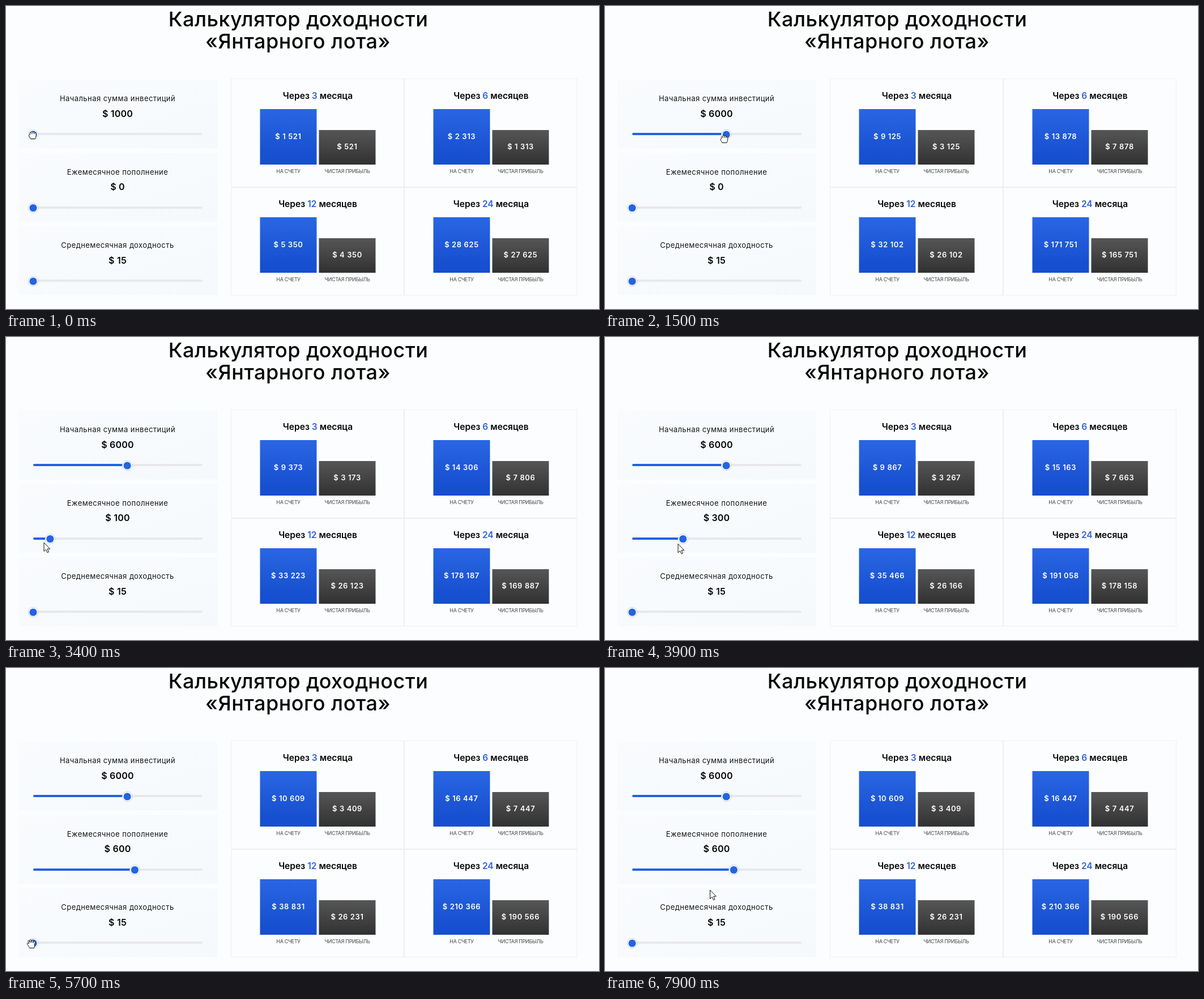
Write an HTML page that moves like this. It is 1047x535 px and loops after 8000 ms.

```html
<!DOCTYPE html>
<html lang="ru">
<head>
<meta charset="utf-8">
<title>Калькулятор доходности</title>
<style>
html, body { margin: 0; width: 100%; height: 100%; overflow: hidden; background: #fcfdfe; }
svg { display: block; width: 100vw; height: 100vh; }
text { font-family: Inter, "Open Sans", sans-serif; text-anchor: middle; fill: #050505; }
.title { font-size: 36px; font-weight: 500; letter-spacing: .5px; }
.label { font-size: 13px; letter-spacing: .45px; fill: #151515; }
.value { font-size: 16px; font-weight: 600; letter-spacing: .2px; }
.head { font-size: 15.6px; font-weight: 600; }
.head tspan { fill: #2f62df; }
.sum { font-size: 13px; font-weight: 600; letter-spacing: .6px; fill: #fff; }
.note { font-size: 9px; letter-spacing: -.35px; fill: #484848; }
</style>
</head>
<body>
<svg id="stage" viewBox="0 0 1047 535">
  <defs>
    <linearGradient id="blue" x2="0" y2="1">
      <stop stop-color="#2a66e3"/><stop offset=".85" stop-color="#164fcf"/>
    </linearGradient>
    <linearGradient id="dark" x2="0" y2="1">
      <stop stop-color="#565656"/><stop offset="1" stop-color="#313131"/>
    </linearGradient>
    <linearGradient id="panel" x2="1" y2="1">
      <stop stop-color="#f9fbfd"/><stop offset="1" stop-color="#f6f9fc"/>
    </linearGradient>
  </defs>
</svg>
<script>
const NS = 'http://www.w3.org/2000/svg';
const stage = document.getElementById('stage');
const LOOP = 8000, STEP = 100;
const TRACK_X = 48, TRACK_W = 299;

function add(tag, attrs, text) {
  const node = document.createElementNS(NS, tag);
  for (const key in attrs) node.setAttribute(key, attrs[key]);
  if (text !== undefined) node.textContent = text;
  stage.appendChild(node);
  return node;
}
const label = (cls, x, y, text) => add('text', { class: cls, x, y }, text);
const rect = (x, y, width, height, fill, rx = 0) => add('rect', { x, y, width, height, fill, rx });

// Keys are [time, value, ...]; linear in between.
function mix(keys, t, i = 1) {
  let a = keys[0];
  for (const b of keys) {
    if (b[0] > t) return a[i] + (b[i] - a[i]) * (t - a[0]) / (b[0] - a[0] || 1);
    a = b;
  }
  return a[i];
}

rect(0, 0, 1047, 535, '#fcfdfe');
label('title', 516, 35.5, 'Калькулятор доходности');
label('title', 515.5, 74.5, '«Янтарного лота»');

const sliders = [
  { name: 'Начальная сумма инвестиций', min: 1000, max: 10000, step: 500,
    keys: [[0, 1000], [100, 1000], [400, 2000], [500, 2000], [900, 3500], [1500, 6000]] },
  { name: 'Ежемесячное пополнение', min: 0, max: 1000, step: 50,
    keys: [[0, 0], [3000, 0], [3400, 100], [3800, 250], [4500, 550], [4700, 600]] },
  { name: 'Среднемесячная доходность', min: 15, max: 25, step: 1,
    keys: [[0, 15], [6000, 15], [6700, 20], [6900, 20], [7400, 15]] }
];
sliders.forEach((s, i) => {
  const y = 129.5 * i, trackY = Math.round(224 + y);
  rect(22, 130 + y, 351, 121.5, 'url(#panel)');
  label('label', 197, 168 + y, s.name);
  s.value = label('value', 197, 195.5 + y, '');
  rect(TRACK_X, trackY, TRACK_W, 4, '#e8e8e9', 2);
  s.fill = rect(TRACK_X, trackY, 0, 4, '#2462e1', 2);
  s.ring = add('circle', { cy: 227 + y, r: 8.7, fill: '#fff', stroke: '#c3d0e4' });
  s.dot = add('circle', { cy: 227 + y, r: 6.6, fill: '#2563e2' });
});

add('path', {
  d: 'M397.5 128.5H1008.5V510.5H397.5Z', fill: 'none', stroke: '#eff0f2'
});
add('path', { d: 'M703 128V511M397 320H1009', stroke: '#eceef0', 'stroke-width': 2 });

const cells = [[3, 'месяца'], [6, 'месяцев'], [12, 'месяцев'], [24, 'месяца']].map(([months, word], i) => {
  const x = 306 * (i % 2), y = 191 * (i >> 1);
  label('head', 550.5 + x, 164 + y, '').innerHTML = `Через <tspan>${months}</tspan> ${word}`;
  rect(448.5 + x, 182 + y, 100, 98, 'url(#blue)');
  rect(552.5 + x, 219 + y, 100, 61, 'url(#dark)');
  label('note', 498.5 + x, 295 + y, 'НА СЧЕТУ');
  label('note', 602.5 + x, 295 + y, 'ЧИСТАЯ ПРИБЫЛЬ');
  return {
    months,
    total: label('sum', 498.5 + x, 234.5 + y, ''),
    profit: label('sum', 602.5 + x, 252.5 + y, '')
  };
});

// Pointer keys: [time, x, y, shape from then on]
const ARROW = 0, OPEN = 1, FIST = 2;
const pointer = [
  [0, 47, 228, FIST], [100, 47, 228, FIST], [400, 72, 230, FIST], [500, 72, 230, FIST],
  [600, 89, 231, ARROW], [900, 138, 232, ARROW], [1400, 200, 234, ARROW],
  [1500, 210.5, 235, FIST], [2000, 210.5, 235, OPEN], [2100, 210.5, 235, OPEN],
  [2200, 190, 250, ARROW], [2500, 112, 313, ARROW], [2800, 41, 363, OPEN],
  [2900, 41, 363, OPEN], [3000, 41, 363, FIST], [3100, 47, 363, ARROW],
  [3400, 67, 363, ARROW], [3800, 116, 365, ARROW], [4500, 207, 367, ARROW],
  [4700, 218, 367, ARROW], [5100, 218, 367, ARROW], [5600, 54, 487, ARROW],
  [5700, 45, 487, OPEN], [5900, 45, 487, OPEN], [6000, 45, 487, FIST],
  [6100, 66, 487, ARROW], [6700, 190, 487, ARROW], [6900, 190, 487, ARROW],
  [7400, 48, 490, ARROW], [7500, 50, 490, ARROW], [7800, 157, 416, ARROW],
  [7900, 185.5, 392, ARROW]
];
const shapes = [
  'M0 0V15.5L3.6 12.2L6.1 17.7L8.5 16.6L6.1 11.2H10.8Z',
  'M-3.5 7.5C-4 5-7 2-7.6 0C-7.8-1.6-6-2-4.6 0L-6-4.4C-6.3-6.4-4.2-6.8-3.6-5L-2.6-2L-2.8-6.3C-2.6-8-.6-8-.3-6.3L.2-2.4L1-6C1.6-7.6 3.5-7 3.2-5.2L2.8-1.8L4.4-4.3C5.6-5.6 7.2-4.4 6.5-2.8C5 1 6 4 4.3 7.5Z',
  'M-3.5 6.5C-4 4.5-6.4 2.8-6.4 .7C-6.4-.6-5.2-1.2-4.6-.8C-6.2-3.6-4.4-5.4-2.8-4.6C-2-6.6 0-6.6 .5-5.2C1.6-6.4 3.3-5.8 3.5-4.2C5.2-5 6.3-3.6 6.2-1.8C6.2 1.5 5.8 4 4.5 6.5Z M-2.7-4.4L-2.2-2 M.6-5L.7-2.2 M3.5-4.1L3.3-1.8'
].map(d => add('path', { d, fill: '#fff', stroke: '#111', 'stroke-linejoin': 'round' }));

// The small bias keeps exact halves rounding up.
const money = n => '$ ' + String(Math.round(n + 1e-6)).replace(/\B(?=(\d{3})+$)/g, ' ');

function draw(now) {
  const t = Math.floor(now % LOOP / STEP) * STEP;
  const [start, monthly, percent] = sliders.map(s => {
    const v = Math.round(mix(s.keys, t) / s.step) * s.step;
    const w = (v - s.min) / (s.max - s.min) * TRACK_W;
    s.value.textContent = '$ ' + v;
    s.fill.setAttribute('width', w);
    s.ring.setAttribute('cx', TRACK_X + w);
    s.dot.setAttribute('cx', TRACK_X + w);
    return v;
  });
  // Three deposits compound; the last one is not counted in the balance.
  const rate = 1 + percent / 100;
  const deposits = 1 + rate + rate ** 2;
  for (const c of cells) {
    const total = start * rate ** c.months + monthly * (deposits * rate ** (c.months - 3) - 1);
    c.total.textContent = money(total);
    c.profit.textContent = money(total - start - monthly * (c.months - 1));
  }
  const shape = pointer.filter(k => k[0] <= t).pop()[3];
  shapes.forEach((p, i) => p.setAttribute('visibility', i === shape ? 'visible' : 'hidden'));
  shapes[shape].setAttribute('transform', `translate(${mix(pointer, t, 1)} ${mix(pointer, t, 2)})`);
}

const begin = performance.now();
function tick() {
  draw(performance.now() - begin);
  requestAnimationFrame(tick);
}
tick();
</script>
</body>
</html>
```
